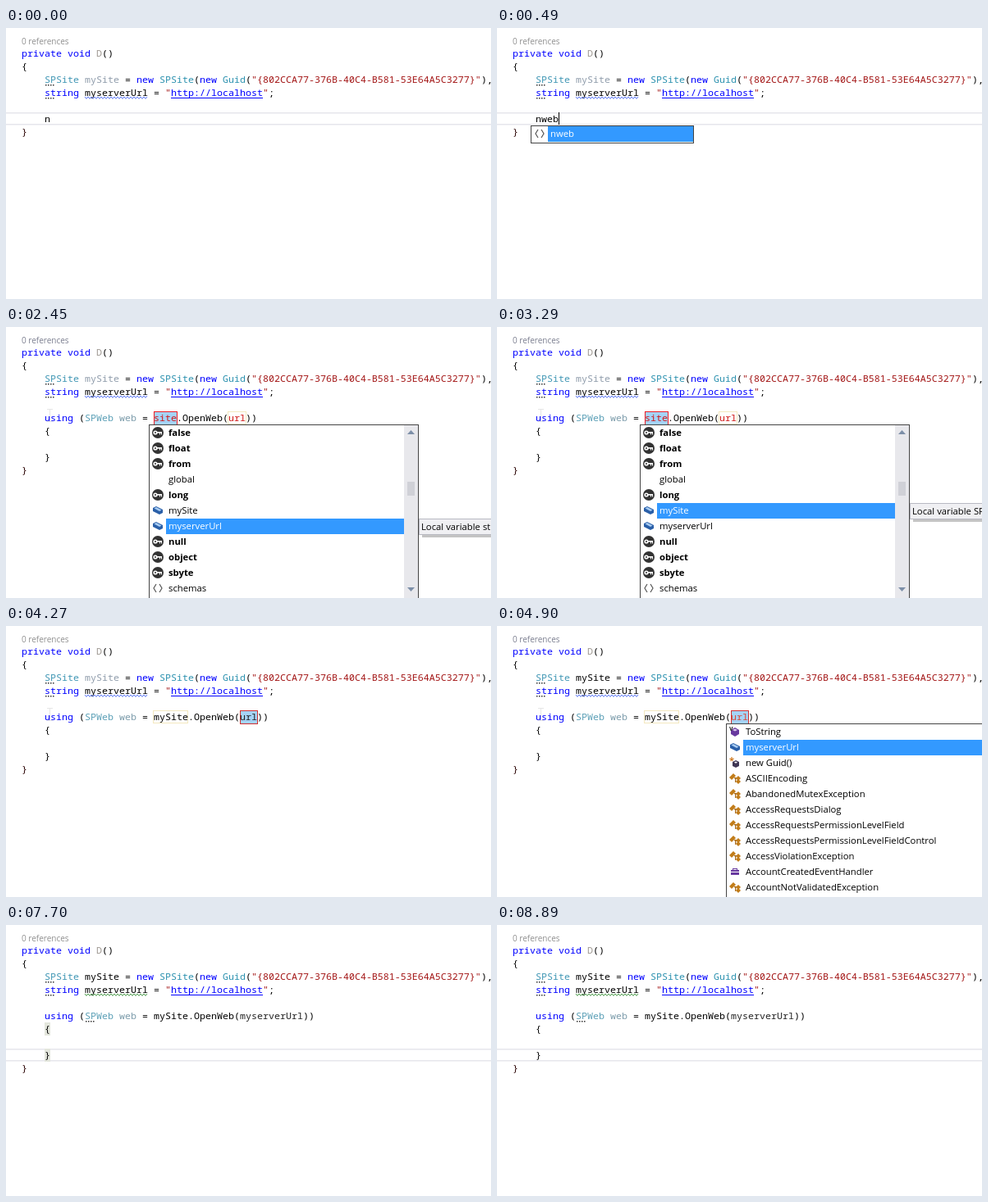
An HTML page with a canvas for the animation above (9030 ms loop, 591 by 331 pixels).

```html
<!DOCTYPE html>
<html>
<head>
<meta charset="utf-8">
<style>
html, body { margin: 0; width: 591px; height: 331px; overflow: hidden; background: #fff; }
canvas { display: block; }
</style>
</head>
<body>
<canvas id="stage" width="591" height="331"></canvas>
<script>
const ctx = document.getElementById('stage').getContext('2d');
const LOOP = 9030, CHAR = 7;
const MONO = '11.667px "Noto Sans Mono", monospace';
const UI = '11.3px "Open Sans", sans-serif';
const BLACK = '#000', KEYWORD = '#0000ff', TYPE = '#2b91af', STRING = '#a31515', MUTED = '#8f9cab';
const SELECTED = '#3399ff', PICKED = '#a5d3f7', LINKED = '#f3e8bf', BRACE = '#280000';

function rect(x, y, w, h, color) {
  ctx.fillStyle = color;
  ctx.fillRect(x, y, w, h);
}
function frame(x, y, w, h, color) {
  ctx.strokeStyle = color;
  ctx.lineWidth = 1;
  ctx.strokeRect(x + .5, y + .5, w - 1, h - 1);
}
function shape(color, ...points) {
  ctx.fillStyle = color;
  ctx.beginPath();
  for (let i = 0; i < points.length; i += 2) ctx.lineTo(points[i], points[i + 1]);
  ctx.fill();
}
function disc(x, y, r, color) {
  ctx.fillStyle = color;
  ctx.beginPath();
  ctx.arc(x, y, r, 0, 7);
  ctx.fill();
}
function label(text, x, y, color, font) {
  ctx.font = font;
  ctx.fillStyle = color;
  ctx.fillText(text, x, y);
}
// Draws alternating text and colour on one line of the editor.
function code(line, x, ...parts) {
  for (let i = 0; i < parts.length; i += 2) {
    label(parts[i], x, 35 + 16 * line, parts[i + 1], MONO);
    x += CHAR * parts[i].length;
  }
}
function caret(x, line) { rect(x, 23 + 16 * line, 1, 15, BLACK); }
function currentLine(line) {
  const y = 22 + 16 * line;
  rect(0, y + 1, 591, 1.5, '#e6e6ec');
  rect(0, y + 15, 591, 1.5, '#e6e6ec');
}
function dots(x, y) {
  for (let i = 0; i < 4; i++) rect(x + i * 3, y, 1.5, 1.5, '#333');
}
function squiggle(x, y, w, color) {
  ctx.strokeStyle = color;
  ctx.lineWidth = 1;
  ctx.beginPath();
  for (let i = 0; i <= w; i += 2) ctx.lineTo(x + i, y + (i % 4 ? 1.5 : -1));
  ctx.stroke();
}
function pointer(x, y) {
  rect(x, y, 7, 1, '#e6e6e6');
  rect(x + 3, y, 1, 16, '#e6e6e6');
  rect(x, y + 15, 7, 1, '#e6e6e6');
}

const icons = {
  none() {},
  key() {
    disc(0, 0, 7, '#333');
    disc(-3, 0, 2.6, '#fff');
    disc(-3, 0, 1, '#333');
    rect(-1, -1, 6, 1.6, '#fff');
    rect(2, 0, 1, 2.5, '#fff');
    rect(4, 0, 1, 2.5, '#fff');
  },
  field() {
    shape('#2a5fa8', -6, -3, -2, -5, 6, -1, 6, 3, 2, 5, -6, 1);
    shape('#a9cdf2', -4.5, -2.5, -2, -4, 4.5, -.5, 2, 1);
  },
  tag() {
    ctx.strokeStyle = '#555';
    ctx.lineWidth = 1.2;
    ctx.beginPath();
    for (const s of [-1, 1]) {
      ctx.moveTo(s * 2, -5);
      ctx.lineTo(s * 5, 0);
      ctx.lineTo(s * 2, 5);
    }
    ctx.stroke();
  },
  method() {
    shape('#68399f', 0, -5, 5, -2, 5, 3, 0, 6, -5, 3, -5, -2);
    shape('#d8c8ec', 0, -3.5, 3, -2, 0, -.5, -3, -2);
    label('v', -7, -1, '#333', 'bold 8px "Open Sans", sans-serif');
  },
  create() {
    shape('#3f3654', 1, -3, 5, -1, 5, 4, 1, 6, -3, 4, -3, -1);
    shape('#fff', 1, -1.5, 3, -.5, 1, .7, -1, -.5);
    label('*', -7, 1, '#d07a20', 'bold 11px "Open Sans", sans-serif');
  },
  type() {
    shape('#c27d1a', -7, -1, -2, -6, 1, -3, -4, 2);
    rect(-1, -1, 5, 1.3, '#a96d20');
    rect(0, -1, 1.3, 6, '#a96d20');
    shape('#c27d1a', 1, 0, 4, -3, 7, 0, 4, 3);
    shape('#c27d1a', 1, 4, 4, 1, 7, 4, 4, 7);
  },
  event() {
    rect(-5, -2, 10, 6, '#68399f');
    frame(-3, -4, 6, 4, '#68399f');
    rect(-5, 0, 10, 1, '#fff');
  }
};

function scrollbar(x, bottom, thumbY) {
  rect(x, 120, 17, bottom - 120, '#e8e8ec');
  shape('#7d8fa8', x + 4, 131, x + 13, 131, x + 8.5, 126);
  shape('#7d8fa8', x + 4, bottom - 13, x + 13, bottom - 13, x + 8.5, bottom - 8);
  rect(x + 4, thumbY, 9, 17, '#d0d1d7');
}
// Each item is "icon text"; a leading "!" makes the text bold.
function popup(left, right, items, selected, thumbY) {
  const height = 3 + 19 * items.length;
  rect(left, 119, right - left, height, '#fff');
  rect(left + 21, 120 + 19 * selected, right - left - 22, 19, SELECTED);
  items.forEach((item, i) => {
    const bold = item[0] === '!', [, icon, text] = item.match(/^!?(\w+) (.*)$/);
    const y = 129 + 19 * i;
    ctx.save();
    ctx.translate(left + 11, y);
    icons[icon]();
    ctx.restore();
    label(text, left + 24, y + 4, i === selected ? '#fff' : BLACK, (bold ? 'bold ' : '') + UI);
  });
  if (thumbY) scrollbar(right - 18, 331, thumbY);
  frame(left, 119, right - left, height + 10 * (items.length > 10), '#444');
}
function tooltip(x, y, text) {
  rect(x + 4, y + 4, 591, 19, '#c4c4c4');
  rect(x, y, 591, 20, '#f0f0f3');
  frame(x, y, 591, 20, '#b8b9c2');
  label(text, x + 3, y + 14, BLACK, UI);
}

const shortItems = ['!key namespace', '!key new', '!key null', 'type NameValueCollection',
  'type NotSupportedException', 'type Nullable', 'type NullReferenceException', 'tag nweb'];
const siteItems = ['!key false', '!key float', '!key from', 'none global', '!key long', 'field mySite',
  'field myserverUrl', '!key null', '!key object', '!key sbyte', 'tag schemas'];
const urlItems = ['method ToString', 'field myserverUrl', 'create new Guid()', 'type ASCIIEncoding',
  'type AbandonedMutexException', 'type AccessRequestsDialog', 'type AccessRequestsPermissionLevelField',
  'type AccessRequestsPermissionLevelFieldControl', 'type AccessViolationException',
  'event AccountCreatedEventHandler', 'type AccountNotValidatedException'];

function drawHeader(t) {
  const listOpen = t >= 2030 && t < 3500 || t >= 4340 && t < 5670;
  label('0 references', 19, 20, listOpen ? '#7c7f90' : '#909090', '10px "Open Sans", sans-serif');
  code(0, 19, 'private void ', KEYWORD, 'D', '#a09a94', '()', BLACK);
  code(1, 19, '{', BLACK);
  code(2, 47, 'SPSite', '#3f96b4', ' mySite', t < 4340 ? MUTED : BLACK, ' = ', BLACK, 'new ', KEYWORD,
    'SPSite', TYPE, '(', BLACK, 'new ', KEYWORD, 'Guid', TYPE, '(', BLACK,
    '"{802CCA77-376B-40C4-B581-53E64A5C3277}"', STRING, '),', BLACK);
  code(3, 47, 'string', KEYWORD, ' myserverUrl = ', BLACK, '"', STRING,
    'http://localhost', KEYWORD, '"', STRING, ';', BLACK);
  rect(201, 85, 112, 1, KEYWORD);
  dots(48, 69);
  dots(48, 85);
  squiggle(96, 85, 77, t < 6020 ? '#5c78f4' : '#4b9a4b');
}

function drawTyping(t) {
  const typed = 'nweb'.slice(0, t < 140 ? 1 : t < 280 ? 2 : t < 420 ? 3 : 4);
  currentLine(5);
  code(5, 47, typed, BLACK);
  code(6, 19, '}', BRACE);
  if (t >= 70 && t < 140) popup(41, 300, shortItems, 1);
  else if (t >= 140 && t < 1470) popup(41, 240, ['tag nweb'], 0);
  if (t >= 70 && (t < 980 || t >= 1400)) caret(47 + CHAR * typed.length, 5);
}

function drawSnippet(t) {
  const siteDone = t >= 3500, urlDone = t >= 5670, urlActive = siteDone && !urlDone;
  const site = siteDone ? 'mySite' : 'site', url = urlDone ? 'myserverUrl' : 'url';
  const urlX = 180 + CHAR * (site.length + 9);

  if (urlDone) currentLine(t < 6580 ? 5 : 8);
  if (t >= 6790 && t < 8890) for (const y of [119, 151]) rect(47, y, 7, 16, '#e3e6dc');
  if (t < 7700) pointer(50, 100);
  if (!siteDone) {
    rect(180, 103, 28, 16, PICKED);
    frame(180, 103, 29, 17, '#ee1c24');
    frame(urlX - 1, 103, 23, 16, LINKED);
  } else if (t < 6580) {
    frame(179, 103, 43, 16, LINKED);
  }
  if (urlActive) {
    rect(urlX, 103, 21, 16, PICKED);
    frame(urlX, 103, 22, 17, '#d03030');
  } else if (urlDone && t < 6580) {
    frame(urlX, 103, 78, 17, '#4a4a4a');
  }

  const urlColor = !siteDone ? '#d01818' : t >= 4340 && urlActive ? '#d84a38' : urlDone && t < 6580 ? '#4a1010' : '#222';
  code(5, 47, 'using', KEYWORD, ' (', BLACK, 'SPWeb', '#5a9fb6', ' web', '#7c9cab', ' = ', BLACK,
    site, siteDone ? BLACK : '#d01818', '.OpenWeb(', BLACK, url, urlColor, '))', BLACK);
  code(6, 47, '{', BLACK);
  code(8, 47, '}', BLACK);
  code(9, 19, '}', BRACE);
  if (t >= 6020) dots(97, 117);

  if (t >= 2030 && !siteDone) {
    const row = t >= 2310 && t < 2660 ? 6 : 5;
    popup(174, 503, siteItems, row, 189);
    if (row === 6 && t >= 2450) tooltip(503, 234, 'Local variable string myserverUrl');
    if (row === 5 && t >= 2800) tooltip(503, 215, 'Local variable SPSite mySite');
  }
  if (t >= 4340 && urlActive) {
    const wide = t >= 4690;
    popup(279, wide ? 620 : 574, urlItems, t < 4830 ? 0 : 1, wide ? 0 : 138);
  }
  if (urlDone && t < 6090) caret(362, 5);
  if (t >= 6580 && t < 7700 || t >= 8120 && t < 8610) caret(54, 8);
}

function draw(now) {
  const t = now % LOOP;
  rect(0, 0, 591, 331, '#fff');
  drawHeader(t);
  (t < 1750 ? drawTyping : drawSnippet)(t);
}
const start = performance.now();
function tick() {
  draw(performance.now() - start);
  requestAnimationFrame(tick);
}
tick();
</script>
</body>
</html>
```
